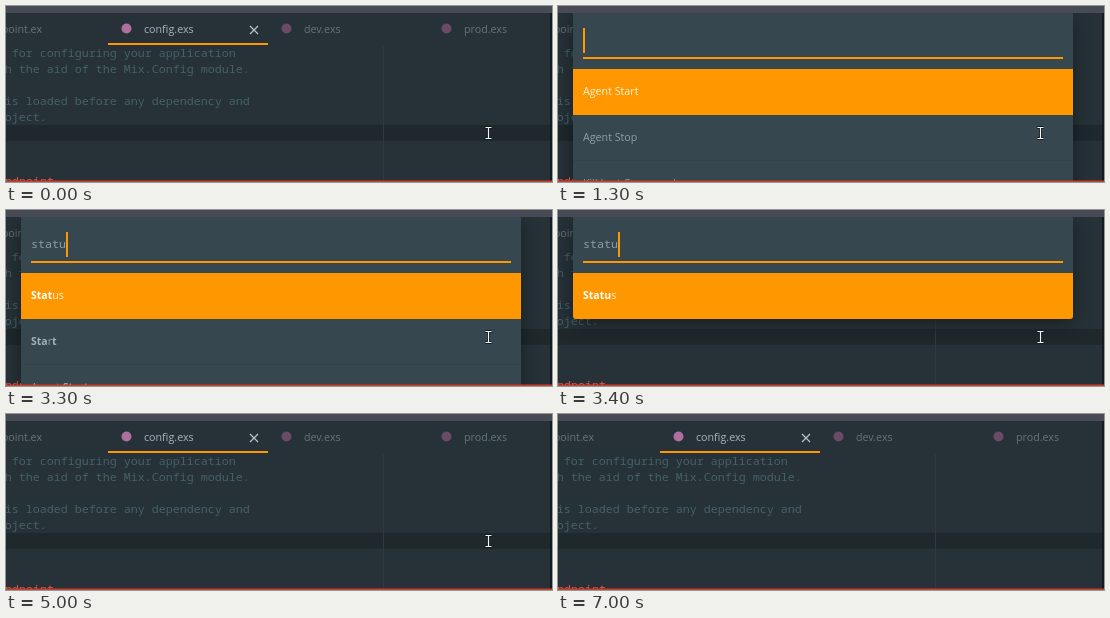
Write an HTML page with a canvas that moves like this. It is 546 px wide and 176 px high and loops after 8000 ms.

```html
<!DOCTYPE html>
<html lang="en">
<head>
<meta charset="utf-8">
<title>Command palette</title>
<style>
  html, body { margin: 0; width: 100%; height: 100%; overflow: hidden; background: #263238; }
  canvas { display: block; }
</style>
</head>
<body>
<canvas id="stage" width="546" height="176"></canvas>
<script>
const ctx = document.getElementById('stage').getContext('2d');
const LOOP = 8000, TICK = 100;
const OPEN = 800, CLOSE = 5000, LEAVE = 6800;
const ORANGE = '#ff9800';
const UI = '10.7px "Open Sans", sans-serif';
const UI_BOLD = 'bold 10.5px "Open Sans", sans-serif';
const MONO = '11.67px "Noto Sans Mono", monospace';
const CHAR = 7, CODE_X = -183;

const WORD = 'status';
const KEY_TIMES = [2100, 2400, 2700, 3000, 3300, 3700];
const RESULTS = [
  ['Agent Start', 'Agent Stop', 'Kill Last Command'],
  ['Stop', 'Start', 'Status'],
  ['Stop', 'Start', 'Status'],
  ['Start', 'Status', 'Agent Start'],
  ['Status', 'Start', 'Agent Start'],
  ['Status'],
  ['Status']
];

const COMMENTS = [
  '# This file is responsible for configuring your application',
  '# and its dependencies with the aid of the Mix.Config module.',
  '#',
  '# This configuration file is loaded before any dependency and',
  '# is restricted to this project.'
];

function rect(x, y, w, h, color) {
  ctx.fillStyle = color;
  ctx.fillRect(x, y, w, h);
}

function text(str, x, y, font, color) {
  ctx.font = font;
  ctx.fillStyle = color;
  ctx.fillText(str, x, y);
  return x + ctx.measureText(str).width;
}

function dot(x, y, color) {
  ctx.fillStyle = color;
  ctx.beginPath();
  ctx.arc(x, y, 5, 0, Math.PI * 2);
  ctx.fill();
}

function drawTabs() {
  ctx.textAlign = 'right';
  text('endpoint.ex', 36, 27, UI, '#65747b');
  ctx.textAlign = 'left';
  dot(120.5, 22.5, '#b0709f');
  text('config.exs', 138, 27, UI, '#a9b5ba');
  dot(280.5, 22.5, '#6b4a68');
  text('dev.exs', 298, 27, UI, '#65747b');
  dot(440.5, 22.5, '#6b4a68');
  text('prod.exs', 458, 27, UI, '#65747b');

  ctx.strokeStyle = '#b4c0c5';
  ctx.lineWidth = 1.3;
  ctx.beginPath();
  ctx.moveTo(244, 20); ctx.lineTo(252, 28);
  ctx.moveTo(252, 20); ctx.lineTo(244, 28);
  ctx.stroke();
  rect(102, 37, 160, 2, ORANGE);
}

function drawEditor() {
  rect(0, 0, 546, 176, '#263238');
  rect(0, 119, 544, 16, '#1e282d');
  rect(377, 40, 1, 136, '#2d3a40');
  drawTabs();
  COMMENTS.forEach((line, i) => text(line, CODE_X, 51 + i * 16, MONO, '#466069'));
  text('ndpoint', CODE_X + 26 * CHAR, 179, MONO, '#e0584a');
}

// Letters of the query are set in bold, starting at the capital S.
function drawLabel(label, query, x, y, selected) {
  const start = label.indexOf('S');
  let hit = 0, run = '', runBold = false;
  const flush = () => {
    const color = selected ? (runBold ? '#ffffff' : '#fff3df') : (runBold ? '#a3b1b7' : '#929fa5');
    if (run) x = text(run, x, y, runBold ? UI_BOLD : UI, color);
    run = '';
  };
  [...label].forEach((ch, i) => {
    const bold = i >= start && hit < query.length && ch.toLowerCase() === query[hit];
    if (bold) hit++;
    if (bold !== runBold) flush();
    runBold = bold;
    run += ch;
  });
  flush();
}

function drawPanel(height) {
  ctx.save();
  ctx.beginPath();
  ctx.rect(0, 7, 544, 169);
  ctx.clip();
  ctx.shadowColor = 'rgba(0,0,0,0.42)';
  ctx.shadowBlur = 18;
  ctx.shadowOffsetY = 4;
  ctx.fillStyle = '#37474f';
  ctx.beginPath();
  ctx.roundRect(15, 7, 500, height, [0, 0, 3, 3]);
  ctx.fill();
  ctx.restore();
}

function drawUnderline(t) {
  const rest = Math.max(0, 1 - (t - OPEN) / 350);
  const width = 480 * (1 - 0.78 * rest * rest);
  if (rest > 0) {
    rect(25, 52, 480, 1, '#82919b');
    rect(265 - width / 2, 51, width, 2, ORANGE);
  } else {
    rect(25, 51, 480, 2, ORANGE);
  }
}

function drawPalette(t) {
  const typed = KEY_TIMES.filter(k => t >= k).length;
  const matched = KEY_TIMES.filter(k => t >= k + TICK).length;
  const items = RESULTS[matched];
  const short = items.length === 1;
  drawPanel(short ? 102 : 200);

  text(WORD.slice(0, typed), 25, 38, MONO, '#8d9ba1');
  const caretHidden = (t >= 1900 && t < 2100) || t >= 4400;
  if (!caretHidden) rect(25 + typed * CHAR, 22, 2, 25, ORANGE);
  drawUnderline(t);

  ctx.fillStyle = ORANGE;
  ctx.beginPath();
  ctx.roundRect(15, 63, 500, 46, short ? [0, 0, 3, 3] : 0);
  ctx.fill();
  if (!short) rect(15, 154, 500, 1, '#34434b');
  items.forEach((label, i) =>
    drawLabel(label, WORD.slice(0, matched), 25, 89 + i * 46, i === 0));

  const bar = Math.min(1, Math.max(0, (1300 - t) / 300));
  if (bar > 0) {
    ctx.globalAlpha = bar;
    rect(513, 63, 2, 113, '#5b6b73');
    ctx.globalAlpha = 1;
  }
}

function drawPointer(t) {
  const step = Math.max(0, Math.floor((t - LEAVE) / TICK) + 1);
  if (step > 2) return;
  const x = 482 + step * 27, y = 127 - step * 24;
  const beam = (color, width) => {
    ctx.strokeStyle = color;
    ctx.lineWidth = width;
    ctx.beginPath();
    ctx.moveTo(x - 2.5, y - 5.5); ctx.lineTo(x + 3.5, y - 5.5);
    ctx.moveTo(x - 2.5, y + 5.5); ctx.lineTo(x + 3.5, y + 5.5);
    ctx.moveTo(x + 0.5, y - 5.5); ctx.lineTo(x + 0.5, y + 5.5);
    ctx.stroke();
  };
  beam('#11181b', 3);
  beam('#f2f4f5', 1.2);
}

function drawFrame() {
  const now = performance.now() % LOOP;
  const t = Math.floor(now / TICK) * TICK;
  drawEditor();
  if (t >= OPEN && t < CLOSE) drawPalette(t);
  rect(0, 0, 546, 7, '#484b55');
  rect(544, 7, 2, 169, '#151b1e');
  rect(0, 174.5, 546, 1.5, '#c9402f');
  drawPointer(t);
  requestAnimationFrame(drawFrame);
}

drawFrame();
</script>
</body>
</html>
```
